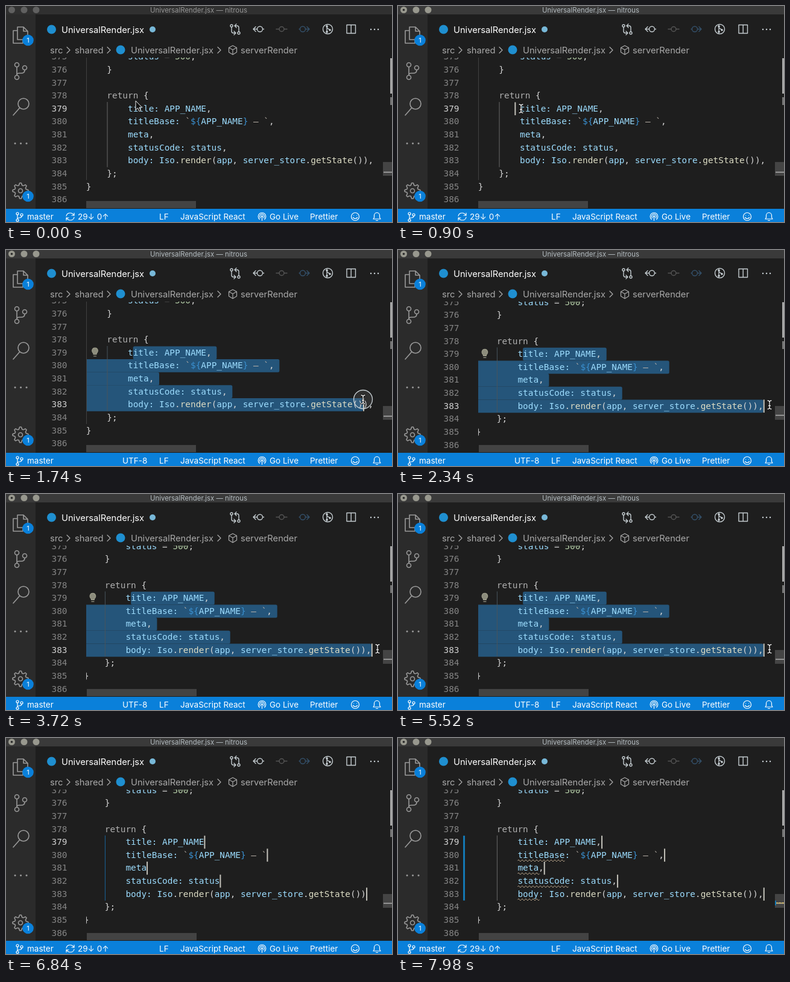
Write an HTML page that moves like this. It is 640 by 360 pixels and loops after 8000 ms.

```html
<!DOCTYPE html>
<html lang="en">
<head>
<meta charset="utf-8">
<title>Editor with several cursors</title>
<style>
  html, body { margin: 0; width: 100%; height: 100%; overflow: hidden; background: #1e1e1e; }
  svg { display: block; width: 100vw; height: 100vh; }
  text { white-space: pre; font-family: Inter, "Open Sans", sans-serif; }
  .mono text { font: 14.4px "DejaVu Sans Mono", "Liberation Mono", monospace; }
  .crumb { font-size: 14.7px; fill: #a9a9a9; }
  .status text { font-size: 13.5px; fill: #fff; }
  .line { fill: none; stroke: currentColor; stroke-linecap: round; stroke-linejoin: round; }
</style>
</head>
<body>
<svg viewBox="0 0 640 360" xmlns="http://www.w3.org/2000/svg">
  <clipPath id="editor"><rect x="133" y="86" width="492" height="252"/></clipPath>
  <rect width="640" height="360" fill="#1e1e1e"/>

  <g class="mono">
    <g clip-path="url(#editor)">
      <g id="selection" fill="#25557a"></g>
      <g id="guides"></g>
      <g id="code"></g>
      <g id="squiggles" fill="none" stroke="#c9b396"></g>
      <g id="carets" fill="#c4c3bb"></g>
    </g>
    <g id="numbers" text-anchor="end"></g>
    <rect id="changed" x="108" width="3" height="108" fill="#1478b4"/>
    <g id="bulb" class="line" color="#9c9c8a" stroke-width="1.2">
      <path d="M-2.500 4V2.500C-7-2-4-7 0-7S7-2 2.500 2.500V4Z" fill="#8c8c7c"/>
      <path d="M-2 7H2"/>
    </g>
  </g>
  <rect x="133" y="325" width="182" height="12" fill="#434343" id="hbar"/>

  <!-- Overview strip -->
  <rect x="637" y="87" width="3" height="59" fill="#a8a8a8"/>
  <rect x="637" y="152" width="3" height="13" fill="#777"/>
  <rect id="stripBlock" x="625" y="260" width="15" height="23" fill="#444"/>
  <path id="stripLine" d="M626 0H640" stroke="#b0b0b0" stroke-width="1.5"/>
  <path id="stripEdit" d="M626 275H640" stroke="#c9b26a" stroke-width="2" stroke-dasharray="4 1"/>
  <rect id="stripMark" x="625" y="271" width="2" height="8" fill="#1478b4"/>

  <!-- Tab and path -->
  <rect x="49" y="14" width="591" height="72" fill="#1e1e1e"/>
  <circle cx="75.500" cy="39" r="7.500" fill="#1f8fd0"/>
  <text x="92" y="45" font-size="14.7" fill="#fff">UniversalRender.jsx</text>
  <circle cx="243" cy="39" r="5" fill="#78b8d8"/>
  <g class="crumb">
    <text x="73" y="79">src</text>
    <text x="114" y="79">shared</text>
    <text x="207" y="79">UniversalRender.jsx</text>
    <text x="389" y="79">serverRender</text>
  </g>
  <circle cx="190" cy="73" r="7.500" fill="#1f8fd0"/>
  <g class="line" color="#a9a9a9" stroke-width="1.2">
    <path d="M101 68.500l5 5-5 5M168 68.500l5 5-5 5M351 68.500l5 5-5 5"/>
    <path d="M376 66l6.500 3.500v7.500l-6.500 4-6.500-4v-7.500zM369.500 69.500l6.500 3.500 6.500-3.500M376 73v8"/>
  </g>

  <!-- Tab actions -->
  <g class="line" color="#c4ccd0" stroke-width="1.4">
    <circle cx="374" cy="33" r="2"/><circle cx="386" cy="45" r="2"/>
    <path d="M374 35v7q0 3 3 3h4m-3-3l3 3-3 3M386 43v-7q0-3-3-3h-4m3-3l-3 3 3 3"/>
    <circle cx="421" cy="38.500" r="4.500"/>
    <path d="M416.500 38.500h-6.500m4-4l-4 4 4 4M425.500 38.500h2"/>
    <g color="#565656"><circle cx="457" cy="38.500" r="4"/><path d="M448 38.500h5m8 0h5"/></g>
    <g color="#34506a"><circle cx="492" cy="38.500" r="4.500"/><path d="M486 38.500h1.500m9 0h6.500m-4-4l4 4-4 4"/></g>
    <circle cx="533.500" cy="38.500" r="8"/>
    <path d="M532 32v13M532 36l5 4"/>
    <g fill="#c4ccd0" stroke-width="1"><circle cx="532" cy="34" r="1.300"/><circle cx="532" cy="43" r="1.300"/><circle cx="537" cy="40" r="1.300"/></g>
    <path d="M565 31.500h14.500v14H565zM572.200 31.500v14"/>
    <path d="M605 39h.1m5.900 0h.1m5.900 0h.1" stroke-width="2.400"/>
  </g>

  <!-- Activity bar -->
  <rect y="14" width="49" height="324" fill="#2b2b2b"/>
  <g class="line" color="#9a9a9a" stroke-width="1.6">
    <path d="M19 35h10l7 7v14H19zM29 35v7h7M19 41h-7v21h16v-6"/>
    <circle cx="18" cy="98" r="3.500"/><circle cx="31" cy="103" r="3.500"/><circle cx="18" cy="119" r="3.500"/>
    <path d="M18 102v13M31 107q0 5-6 5h-3q-4 0-4 3"/>
    <circle cx="29" cy="163" r="9"/><path d="M22.500 170L12 182"/>
    <path d="M15 229h.1m9.400 0h.1m9.400 0h.1" stroke-width="3"/>
    <circle cx="24" cy="308" r="3.500"/><path id="gear"/>
  </g>
  <g fill="#0a80da"><circle cx="36.500" cy="57" r="9.300"/><circle cx="36.500" cy="317" r="9.300"/></g>
  <g fill="#fff" font-size="11" text-anchor="middle"><text x="36.500" y="61">1</text><text x="36.500" y="321">1</text></g>

  <!-- Title bar -->
  <rect id="titleBar" width="640" height="14"/>
  <g id="lights"><circle cx="9.500" cy="6.500" r="5.500"/><circle cx="30" cy="6.500" r="5.500"/><circle cx="50" cy="6.500" r="5.500"/></g>
  <circle id="unsaved" cx="9.500" cy="6.500" r="1.800" fill="#2a2a2a"/>
  <text id="title" x="239" y="11" font-size="11.400">UniversalRender.jsx — nitrous</text>

  <!-- Status bar -->
  <g class="status">
    <rect y="338" width="640" height="22" fill="#0a80da"/>
    <text x="35" y="356">master</text>
    <text id="sync" x="119" y="356">29↓ 0↑</text>
    <text id="encoding" x="193" y="356">UTF-8</text>
    <text x="254" y="356">LF</text>
    <text x="289" y="356">JavaScript React</text>
    <text x="437" y="356">Go Live</text>
    <text x="504" y="356">Prettier</text>
    <g class="line" color="#fff" stroke-width="1.200">
      <circle cx="19" cy="346" r="2"/><circle cx="26" cy="348" r="2"/><circle cx="19" cy="357" r="2"/>
      <path d="M19 348v7M26 350q0 3-4 3-3 0-3 2"/>
      <path id="syncIcon" d="M100 350q1-5 6.500-5 4 0 6 4m.5-4v4h-4M113 352q-1 5-6.500 5-4 0-6-4m-.5 4v-4h4"/>
      <circle cx="424.500" cy="350.500" r="1.200"/>
      <path d="M424.500 352.500v5M421.800 353a3.700 3.700 0 1 1 5.400 0M420.300 355.500a6.300 6.300 0 1 1 8.400 0"/>
      <circle cx="579" cy="351" r="6.500"/><path d="M575.500 352.500q3.500 4 7 0M576.500 349h.1m4.900 0h.1"/>
      <path d="M609 355h12l-1.500-2.500V349a4.500 4.500 0 0 0-9 0v3.500zM613.500 357.500h3"/>
    </g>
  </g>

  <!-- Pointer -->
  <g id="pointer">
    <circle id="ring" r="15.500" fill="#fff" fill-opacity=".08" stroke="#c8d0d4" stroke-width="1.300"/>
    <path id="arrow" d="M0 0V15L3.500 12 6 17.500 8.500 16.500 6 11H10.500Z" fill="#111" stroke="#eee"/>
    <g id="beam" class="line">
      <path d="M-3-7Q0-7 0-4V4Q0 7-3 7M3-7Q0-7 0-4M3 7Q0 7 0 4M-1.500 1.500H1.500" stroke="#111" stroke-width="3"/>
      <path d="M-3-7Q0-7 0-4V4Q0 7-3 7M3-7Q0-7 0-4M3 7Q0 7 0 4M-1.500 1.500H1.500" stroke="#f0f0f0" stroke-width="1.300"/>
    </g>
  </g>
</svg>

<script>
const LOOP = 8000, STEP = 60;
const CHAR = 8.667, ROW = 21.65, LEFT = 202, TOP = 160.4, FIRST = 379;
const KEY = '#9cdcfe', PLAIN = '#d4d4d4', CALL = '#dcdcc4', BLUE = '#3a90d0', STRING = '#bcb4ac';

// Row number, column relative to the object keys, coloured pieces.
const CODE = [
  [375, 0, [KEY, 'status'], [PLAIN, ' = '], ['#b5cea8', '500'], [PLAIN, ';']],
  [376, -4, [PLAIN, '}']],
  [378, -4, ['#b0b0b0', 'return'], [PLAIN, ' {']],
  [379, 0, [KEY, 'title: APP_NAME'], [PLAIN, ',']],
  [380, 0, [KEY, 'titleBase: '], [STRING, '`'], [BLUE, '${'], [KEY, 'APP_NAME'], [BLUE, '}'], [STRING, ' – `'], [PLAIN, ',']],
  [381, 0, [KEY, 'meta'], [PLAIN, ',']],
  [382, 0, [KEY, 'statusCode: status'], [PLAIN, ',']],
  [383, 0, [KEY, 'body: Iso'], [PLAIN, '.'], [CALL, 'render'], [PLAIN, '('], [KEY, 'app'], [PLAIN, ', '],
    [KEY, 'server_store'], [PLAIN, '.'], [CALL, 'getState'], [PLAIN, '())'], [PLAIN, ',']],
  [384, -4, [PLAIN, '};']],
  [385, -8, [PLAIN, '}']],
];
const LENGTHS = [16, 28, 5, 19, 47];
const WORDS = [0, 9, 4, 10, 4];
const PATH = [[0, 215, 158], [180, 201, 171], [540, 201, 171], [900, 204, 171], [1080, 211, 171],
  [1320, 300, 192], [1560, 490, 232], [1740, 592, 249], [1860, 592, 249], [2040, 616, 258]];
const CARET_OFF = [[0, 540], [2520, 2820], [3300, 3720], [4200, 4620], [5100, 5520], [6180, 6600], [7200, 7740]];

const $ = id => document.getElementById(id);
const set = (el, attrs) => { for (const k in attrs) el.setAttribute(k, attrs[k]); return el; };
const make = (parent, tag, attrs = {}, text = '') => {
  const el = set(document.createElementNS('http://www.w3.org/2000/svg', tag), attrs);
  el.textContent = text;
  return parent.appendChild(el);
};
const show = (el, on) => set(el, { visibility: on ? 'visible' : 'hidden' });
const rowTop = row => TOP + (row - FIRST) * ROW;
const within = (t, a, b) => t >= a && t < b;

const commas = [], numbers = [];
for (const [row, col, ...parts] of CODE) {
  const line = make($('code'), 'text', { x: LEFT + col * CHAR, y: rowTop(row) + 15.4 });
  for (const [fill, text] of parts) {
    const span = make(line, 'tspan', { fill }, text);
    if (text === ',') commas.push(span);
  }
}
for (let row = 375; row <= 386; row++) {
  numbers[row] = make($('numbers'), 'text', { x: 101.5, y: rowTop(row) + 15.4 }, row);
}
make($('guides'), 'path', { d: 'M133.500 86V290', stroke: '#404040' });
const innerGuide = make($('guides'), 'path', { d: 'M168 160V268.600' });

const carets = LENGTHS.map(() => make($('carets'), 'rect', { width: 2, height: ROW }));
const bands = LENGTHS.map((_, i) => make($('selection'), 'rect', { y: rowTop(FIRST + i), height: ROW + 0.1, rx: 2.5 }));
WORDS.forEach((n, i) => {
  if (!n) return;
  const waves = Math.round(n * CHAR / 6);
  make($('squiggles'), 'path', { d: `M${LEFT} ${rowTop(FIRST + i) + 20}` + 'q1.500-3 3 0t3 0'.repeat(waves) });
});

let gear = '';
for (let i = 0; i < 32; i++) {
  const a = (i - 0.5) * Math.PI / 16, r = i % 4 < 2 ? 13 : 9.5;
  gear += `${i ? 'L' : 'M'}${24 + r * Math.cos(a)} ${308 + r * Math.sin(a)}`;
}
set($('gear'), { d: gear + 'Z' });

function pointerAt(t) {
  const i = PATH.findIndex(p => p[0] > t);
  if (i < 0) return PATH[PATH.length - 1].slice(1);
  const [t0, x0, y0] = PATH[i - 1], [t1, x1, y1] = PATH[i], u = (t - t0) / (t1 - t0);
  return [x0 + (x1 - x0) * u, y0 + (y1 - y0) * u];
}

function render(time) {
  const t = Math.floor(time / STEP) * STEP;
  const focused = t >= 540, selecting = within(t, 1080, 5700), multi = t >= 5700;
  const cut = within(t, 6600, 7740), edited = t >= 7020;
  const dx = -3.6 * Math.min(1, Math.max(0, (t - 1860) / 180));
  const dy = t >= 2280 ? 2.4 : 0;
  const [px, py] = pointerAt(t);

  set($('titleBar'), { fill: focused ? '#3a3a3a' : '#303030' });
  set($('title'), { fill: focused ? '#b4bcc0' : '#959595' });
  set($('lights'), { fill: focused ? '#98988e' : '#606060' });
  show($('unsaved'), focused);

  for (const id of ['selection', 'guides', 'code', 'squiggles', 'carets']) {
    set($(id), { transform: `translate(${dx} ${dy})` });
  }
  set($('numbers'), { transform: `translate(0 ${dy})` });
  set($('hbar'), { x: t >= 1920 ? 134 : 133 });

  // Selection runs from just after the first letter to the pointer.
  const head = Math.min(4, Math.max(0, Math.floor((py - TOP) / ROW)));
  const col = Math.min(LENGTHS[head], Math.max(1, Math.round((px - LEFT) / CHAR)));
  bands.forEach((band, i) => {
    const x0 = i ? 130 : LEFT + CHAR;
    const x1 = LEFT + (i === head ? col : LENGTHS[i] + 1) * CHAR;
    set(band, { x: x0, width: Math.max(0, x1 - x0) });
    show(band, selecting && i <= head);
  });

  const caretOn = !CARET_OFF.some(([a, b]) => within(t, a, b));
  carets.forEach((caret, i) => {
    let row = i, c = LENGTHS[i] - (cut ? 1 : 0);
    if (!multi) { row = selecting ? head : 0; c = selecting ? col : -1; }
    set(caret, { x: LEFT + c * CHAR, y: rowTop(FIRST + row) });
    show(caret, caretOn && (multi || i === 0));
  });

  const active = FIRST + (selecting ? head : 0);
  numbers.forEach((n, row) => set(n, { fill: row === active ? '#d0d0d0' : '#858585' }));
  commas.forEach(c => set(c, { 'fill-opacity': cut ? 0 : 1 }));
  set(innerGuide, { stroke: within(t, 6600, 7020) ? '#1b659c' : selecting ? '#48545c' : '#686868' });

  show($('squiggles'), t >= 7140);
  show($('changed'), edited);
  set($('changed'), { y: rowTop(FIRST) + dy });
  show($('bulb'), within(t, 1500, 5700));
  set($('bulb'), { transform: `translate(${147.5 + dx} ${170 + dy})` });

  show($('sync'), !selecting);
  show($('syncIcon'), !selecting);
  show($('encoding'), selecting);
  set($('stripLine'), { transform: `translate(0 ${dy ? 275.5 : 277})` });
  show($('stripEdit'), edited);
  show($('stripMark'), edited);

  show($('pointer'), !multi);
  set($('pointer'), { transform: `translate(${px} ${py})` });
  set($('arrow'), { opacity: t < 120 ? 1 : 0 });
  set($('beam'), { opacity: t < 120 ? 0 : 1 });
  set($('ring'), { opacity: within(t, 540, 840) || within(t, 1080, 2280) ? 1 : 0 });
}

function tick() {
  render(performance.now() % LOOP);
  requestAnimationFrame(tick);
}
tick();
</script>
</body>
</html>
```
